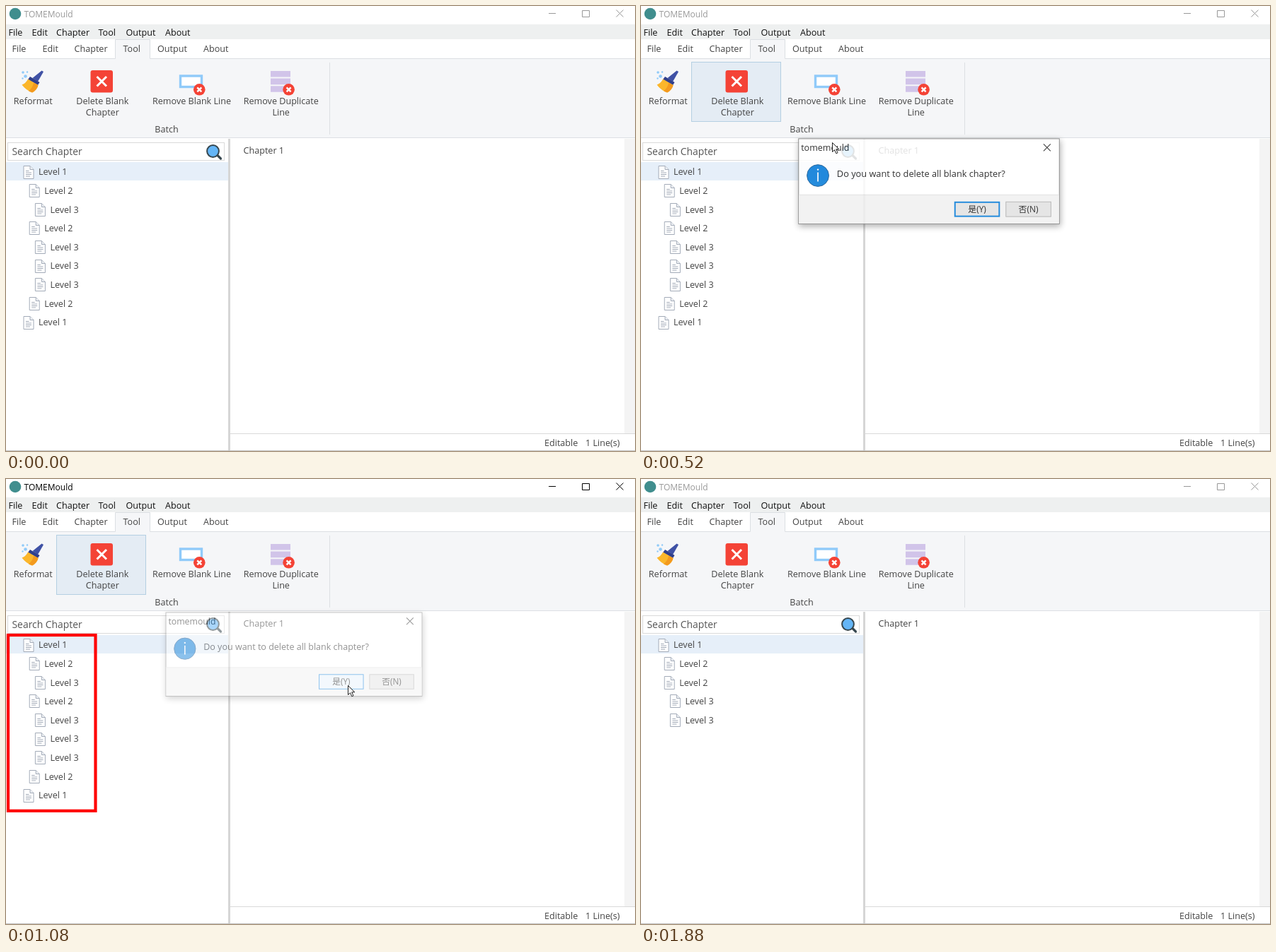
An HTML page that plays this animation: 889x630 px, repeating every 1.92 s.

```html
<!DOCTYPE html>
<html lang="en">
<head>
<meta charset="utf-8">
<title>Delete blank chapters</title>
<style>
html, body { margin: 0; width: 100%; height: 100%; overflow: hidden; background: #fff; }
svg { display: block; width: 100%; height: 100%; }
text { font: 12.6px "Open Sans", "Noto Sans", "Noto Sans CJK SC", sans-serif; fill: #444; white-space: pre; }
.mid { text-anchor: middle; }
.dark text, text.dark { fill: #111; }
</style>
</head>
<body>
<svg viewBox="0 0 889 630" xmlns="http://www.w3.org/2000/svg">
  <defs>
    <filter id="shadow" x="-10%" y="-20%" width="120%" height="150%">
      <feDropShadow dx="1" dy="3" stdDeviation="5" flood-color="#000" flood-opacity=".38"/>
    </filter>
    <g id="page">
      <path d="M.5 .5H9.500L14.500 5.500V18.500H.5Z" fill="#fff" stroke="#a3abb8"/>
      <path d="M9.500 .5V5.500H14.500" fill="#eef1f5" stroke="#a3abb8"/>
      <path d="M3.500 7.500H8M3.500 10H11.500M3.500 12.500H11.500M3.500 15H9.500" stroke="#a3abb8" fill="none"/>
    </g>
    <g id="badge">
      <circle r="8.300" fill="#f44336"/>
      <path d="M-3 -3L3 3M3 -3L-3 3" stroke="#fff" stroke-width="2.500"/>
    </g>
  </defs>

  <rect width="889" height="630" fill="#fff"/>

  <!-- title bar -->
  <circle cx="13" cy="11" r="8.300" fill="#408e8e"/>
  <text id="title" x="25.500" y="15.500" style="font-size:12px">TOMEMould</text>
  <path id="controls" d="M767 10.500H777M814.500 6.500H824.500V15.500H814.500ZM862.500 5.500L872.500 15.500M872.500 5.500L862.500 15.500" fill="none"/>

  <!-- menu and tabs -->
  <rect y="26" width="889" height="21" fill="#eef0f0"/>
  <g id="menu" class="dark"></g>
  <rect y="74" width="889" height="112" fill="#f5f6f8"/>
  <path d="M0 74.500H154.500V47.500H203.500V74.500H889" fill="none" stroke="#dcdfe3"/>
  <rect x="155" y="48" width="48" height="28" fill="#f5f6f8"/>
  <path d="M0 186.500H889M457.500 80V182" stroke="#dcdfe3"/>
  <g id="tabs"></g>

  <!-- ribbon -->
  <rect id="hover" x="71.500" y="79.500" width="126" height="84" fill="#e4ecf4" stroke="#b4cfe2"/>
  <g id="labels"></g>
  <g>
    <path d="M50.500 91.500L53 93L45 107L37.500 102Z" fill="#3f51a5"/>
    <path d="M34 100L47.500 108L45 112L31 104Z" fill="#303f8c"/>
    <path d="M31 103.500L45.500 112Q44 119 37 122.500Q28 119 22.500 111.500Q28 109.500 31 103.500Z" fill="#fbb62b"/>
    <path d="M39 108.500L45.500 112Q44 119 37 122.500L32 120.500Q38 115.500 39 108.500Z" fill="#f39a1f"/>
    <g fill="#90caf9">
      <circle cx="24" cy="94" r="1.800"/><circle cx="30" cy="93.500" r="1.200"/>
      <circle cx="27.500" cy="99.500" r="2.300"/><circle cx="23.500" cy="102.500" r="1.200"/>
    </g>
  </g>
  <rect x="119.500" y="91" width="31.500" height="31.500" rx="3" fill="#f44336"/>
  <path d="M128.500 100L142 113.500M142 100L128.500 113.500" stroke="#fff" stroke-width="3"/>
  <rect x="246.500" y="99" width="30" height="15.500" fill="#fff" stroke="#90caf9" stroke-width="3.400"/>
  <use href="#badge" x="273.300" y="118.300"/>
  <path d="M374 96.300H402M374 106.900H402M374 117.500H402" stroke="#d1c4e9" stroke-width="8.600"/>
  <use href="#badge" x="399.600" y="118.300"/>

  <!-- chapter panel -->
  <rect x="2.500" y="193.500" width="306" height="25" fill="#fff" stroke="#dadada"/>
  <text x="8.500" y="211.300" style="font-size:13.900px;fill:#555">Search Chapter</text>
  <path d="M299 211.500L303.500 216" stroke="#37474f" stroke-width="3.200" stroke-linecap="round"/>
  <circle cx="292.500" cy="205.500" r="8.400" fill="#64b5f6" stroke="#37474f" stroke-width="2"/>
  <rect y="221" width="314" height="26" fill="#e6eff9"/>
  <g id="before"></g>
  <g id="after"></g>

  <!-- editor -->
  <rect x="314" y="188" width="3" height="442" fill="#d6d6d6"/>
  <rect x="874" y="188" width="15" height="417" fill="#f4f4f4"/>
  <path d="M317 605.500H889" stroke="#d9d9d9"/>
  <path d="M0 629.500H889" stroke="#c4c4c4"/>
  <text x="335.500" y="209">Chapter 1</text>
  <text x="761" y="623.300">Editable</text>
  <text x="819" y="623.300">1 Line(s)</text>

  <rect id="mark" fill="none" stroke="#f00" stroke-width="4.200"/>

  <g id="dialog" class="dark">
    <g filter="url(#shadow)">
      <rect x="221.500" y="187.500" width="371" height="121.500" fill="#fff" stroke="#777"/>
    </g>
    <path d="M222 267H592V308.500H222Z" fill="#f0f0f0"/>
    <path d="M222 267.500H592" stroke="#dfdfdf"/>
    <text x="225" y="204.700">tomemould</text>
    <path d="M570 195L580 205M580 195L570 205" stroke="#222" stroke-width="1.100"/>
    <circle cx="249" cy="240" r="15.500" fill="#0078d7" stroke="#0a4f8c"/>
    <path d="M249 235.500V248.500" stroke="#fff" stroke-width="1.700"/>
    <circle cx="249" cy="231.500" r="1.200" fill="#fff"/>
    <text x="276" y="241.500" style="font-size:12.850px">Do you want to delete all blank chapter?</text>
    <rect id="yes"/>
    <text class="mid" x="475.500" y="292.500" style="font-size:12px">是(Y)</text>
    <rect x="516.500" y="277.500" width="64" height="21" fill="#e1e1e1" stroke="#adadad"/>
    <text class="mid" x="548.500" y="292.500" style="font-size:12px">否(N)</text>
  </g>

  <circle id="press" r="12.500" fill="#f4ee2a" fill-opacity=".72"/>
  <path id="arrow" d="M.5 .5V13.500L3.500 10.700L5.800 15.800L8 14.800L5.700 9.800H9.800Z" fill="#fff" stroke="#222"/>
  <path id="beam" d="M-3 -6.500H-1Q0 -6.500 0 -5.500Q0 -6.500 1 -6.500H3M0 -5.500V5.500M-3 6.500H-1Q0 6.500 0 5.500Q0 6.500 1 6.500H3" fill="none" stroke="#222" stroke-width="1.200"/>
</svg>
<script>
const LOOP = 1920, STEP = 40;
const $ = id => document.getElementById(id);
const set = (el, attrs) => { for (const k in attrs) el.setAttribute(k, attrs[k]); };
const show = (id, on) => set($(id), { display: on ? 'inline' : 'none' });
const within = (t, a, b) => t >= a && t < b;

function add(parent, tag, attrs, text) {
  const el = document.createElementNS('http://www.w3.org/2000/svg', tag);
  set(el, attrs);
  if (text) el.textContent = text;
  $(parent).appendChild(el);
}

const items = ['File', 'Edit', 'Chapter', 'Tool', 'Output', 'About'];
function addRow(parent, xs, y) {
  items.forEach((s, i) => add(parent, 'text', { x: xs[i], y }, s));
}
addRow('menu', [3.5, 36.5, 71, 130.5, 169.5, 225], 41.7);
addRow('tabs', [8.5, 51.5, 96.5, 165.5, 214, 279], 64.8);

[['Reformat', 38.3, 139], ['Delete Blank', 136.3, 139], ['Chapter', 136.3, 155],
 ['Remove Blank Line', 262.5, 139], ['Remove Duplicate', 388.7, 139],
 ['Line', 388.7, 155], ['Batch', 227, 178.5]
].forEach(([s, x, y]) => add('labels', 'text', { x, y, class: 'mid' }, s));

function addTree(parent, levels) {
  levels.forEach((n, i) => {
    const x = 24.5 + (n - 1) * 8.2, y = i * 26.63;
    add(parent, 'use', { href: '#page', x, y: Math.round(225.5 + y) });
    add(parent, 'text', { x: x + 21.5, y: 239.3 + y }, 'Level ' + n);
  });
}
addTree('before', [1, 2, 3, 2, 3, 3, 3, 2, 1]);
addTree('after', [1, 2, 2, 3, 3]);

// pointer path: time, x, y
const path = [
  [80, 226, 37], [240, 151, 128], [480, 151, 128], [600, 507, 323],
  [680, 507, 323], [920, 483, 292], [1480, 483, 292], [1520, 505, 303], [1760, 540, 612]
];
function pointer(t) {
  let i = 1;
  while (i < path.length - 1 && t > path[i][0]) i++;
  const [t0, x0, y0] = path[i - 1], [t1, x1, y1] = path[i];
  const k = Math.max(0, Math.min(1, (t - t0) / (t1 - t0)));
  return [x0 + (x1 - x0) * k, y0 + (y1 - y0) * k];
}

// dialog visibility from 0 to 1
function dialogLevel(t) {
  if (t < 480 || t >= 1160) return 0;
  if (t < 560) return t < 520 ? 0.4 : 0.85;
  if (t < 1080) return 1;
  return t < 1120 ? 0.45 : 0.12;
}

function draw(t) {
  const [x, y] = pointer(t);
  const level = dialogLevel(t);
  const active = within(t, 400, 480) || within(t, 1080, 1800);
  const visible = within(t, 80, 1760);

  $('title').style.fill = active ? '#000' : '#999';
  set($('controls'), { stroke: active ? '#000' : '#999' });

  const overButton = x > 71 && x < 198 && y > 79 && y < 164;
  show('hover', within(t, 80, 1160) && (overButton || t >= 400));

  show('before', t < 1160);
  show('after', t >= 1160);

  show('mark', within(t, 800, 1720));
  set($('mark'), t < 1160
    ? { x: 3, y: 221, width: 123.5, height: 248.8 }
    : { x: 5.2, y: 221, width: 120.6, height: 138 });

  show('dialog', level > 0);
  const s = 1 - (1 - level) * 0.044;
  set($('dialog'), {
    opacity: level,
    transform: `translate(407 248) scale(${s}) translate(-407 -248)`
  });
  const overYes = x > 443 && x < 508 && y > 277 && y < 299;
  set($('yes'), overYes
    ? { x: 443.5, y: 277.5, width: 64, height: 21, fill: '#e5f1fb', stroke: '#0078d7', 'stroke-width': 1 }
    : { x: 444, y: 278, width: 63, height: 20, fill: '#e1e1e1', stroke: '#0078d7', 'stroke-width': 2 });

  const beam = t >= 1160 && x > 317 && y < 605;
  show('press', within(t, 400, 480) || within(t, 1000, 1080));
  show('arrow', visible && !beam);
  show('beam', visible && beam);
  const at = { transform: `translate(${Math.round(x)} ${Math.round(y)})` };
  ['press', 'arrow', 'beam'].forEach(id => set($(id), at));
}

const start = performance.now();
function tick() {
  const t = (performance.now() - start) % LOOP;
  draw(Math.floor(t / STEP) * STEP);
  requestAnimationFrame(tick);
}
draw(0);
requestAnimationFrame(tick);
</script>
</body>
</html>
```
